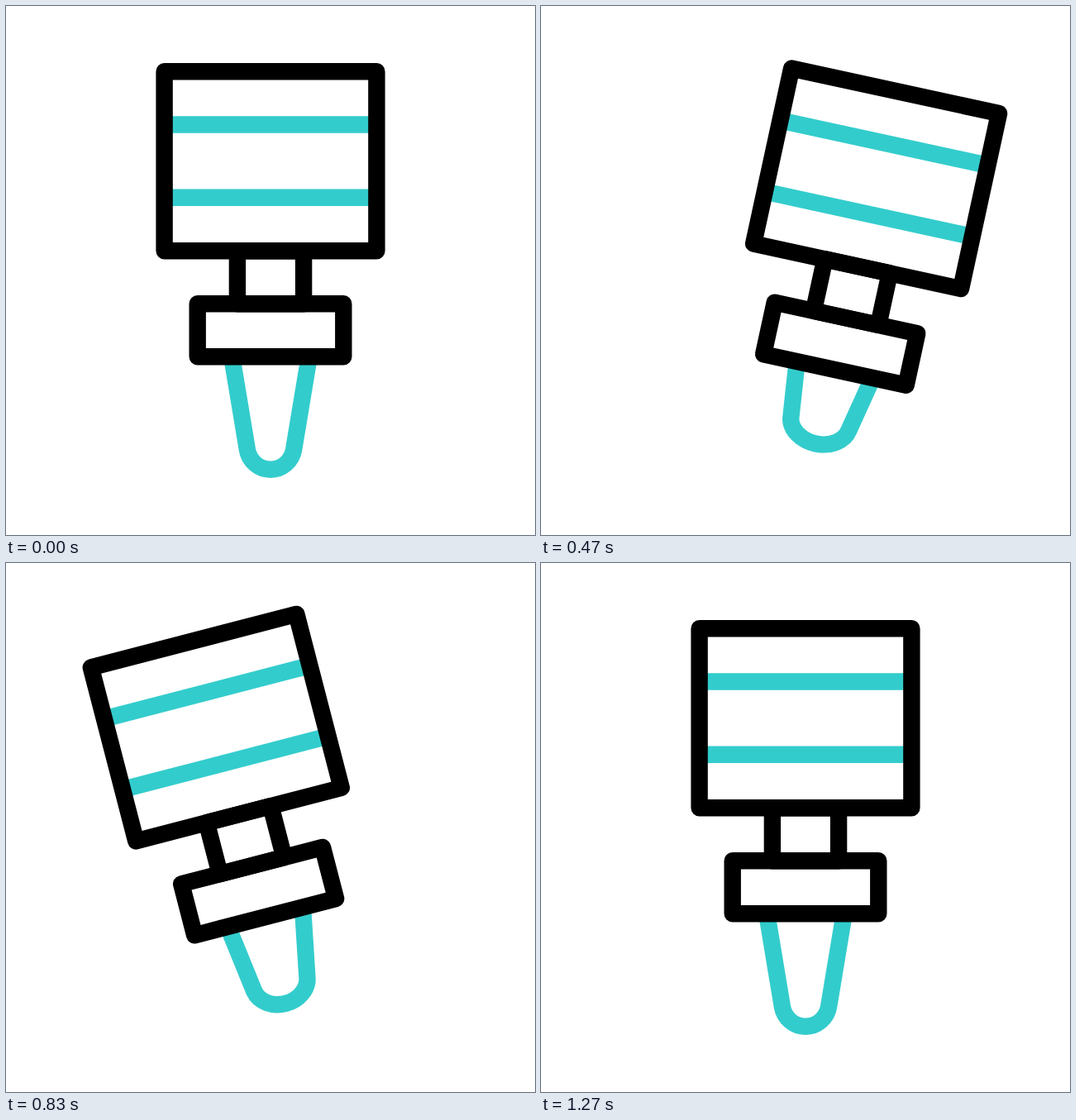
An HTML page for the animation above (1.67 s loop, 640 by 640 pixels).

```html
<!DOCTYPE html>
<html lang="en">
<head>
<meta charset="utf-8">
<title>Swaying plug</title>
<style>
  html, body { margin: 0; width: 100%; height: 100%; overflow: hidden; background: #fff; }
  svg { display: block; width: 100%; height: 100%; }
  g { fill: none; stroke: #000; stroke-width: 20.4; stroke-linejoin: round; }
  .teal { stroke: #3cc; }
</style>
</head>
<body>
<svg viewBox="0 0 640 640">
  <g id="plug">
    <path class="teal" d="M192 143.5H448M192 231.7H448"/>
    <path class="teal" id="tip"/>
    <path d="M191.6 79.2H448.4V296.2H191.6Z"/>
    <path d="M279.9 296.2H360.1V360.2H279.9Z"/>
    <path d="M231.7 360.2H408.3V424.3H231.7Z"/>
  </g>
</svg>
<script>
const LOOP = 1670, FPS = 30;
const plug = document.getElementById('plug');
const tip = document.getElementById('tip');

const linear = p => p;
const smooth = p => p * p * p * (p * (6 * p - 15) + 10);

// The legs stay fixed at the base; pressing lifts the rounded end and widens it.
function tipPath(lift) {
  const x = 320 - 0.085 * lift, y = 537 - lift, bottom = y + 23.7;
  const w = 28.07 + 0.175 * lift, handle = w * 0.493;
  const left = x - w, right = x + w;
  return `M273.2 424.3L${left} ${y}` +
    `C${left + 2.4} ${y + 13.6} ${x - handle} ${bottom} ${x} ${bottom}` +
    `S${right - 2.4} ${y + 13.6} ${right} ${y}L366.8 424.3`;
}

function draw() {
  const frame = Math.floor((performance.now() % LOOP + 5) * FPS / 1000);
  // Progress from 0 to 1 between two frames.
  const ramp = (from, to, ease = smooth) =>
    ease(Math.min(1, Math.max(0, (frame - from) / (to - from))));

  // Lean right, swing left, return upright.
  const angle = 12.5 * ramp(0.8, 13) - 27.2 * ramp(12.6, 26.2) + 14.7 * ramp(26.2, 38);
  const x = 8.4 * ramp(1, 18, linear) + 19.6 * ramp(16, 23.5) - 28 * ramp(25.5, 38);
  const y = 15.5 * ramp(1, 17, linear) - 20 * ramp(17, 27, linear) + 4.5 * ramp(27, 37);

  // One press during each lean.
  const lift = 44 * (ramp(7, 13) - ramp(15.7, 20.5) + ramp(21.5, 27.5) - ramp(30, 36));

  plug.setAttribute('transform', `translate(${x} ${y}) rotate(${angle} 320 561)`);
  tip.setAttribute('d', tipPath(lift));
  requestAnimationFrame(draw);
}
draw();
</script>
</body>
</html>
```
